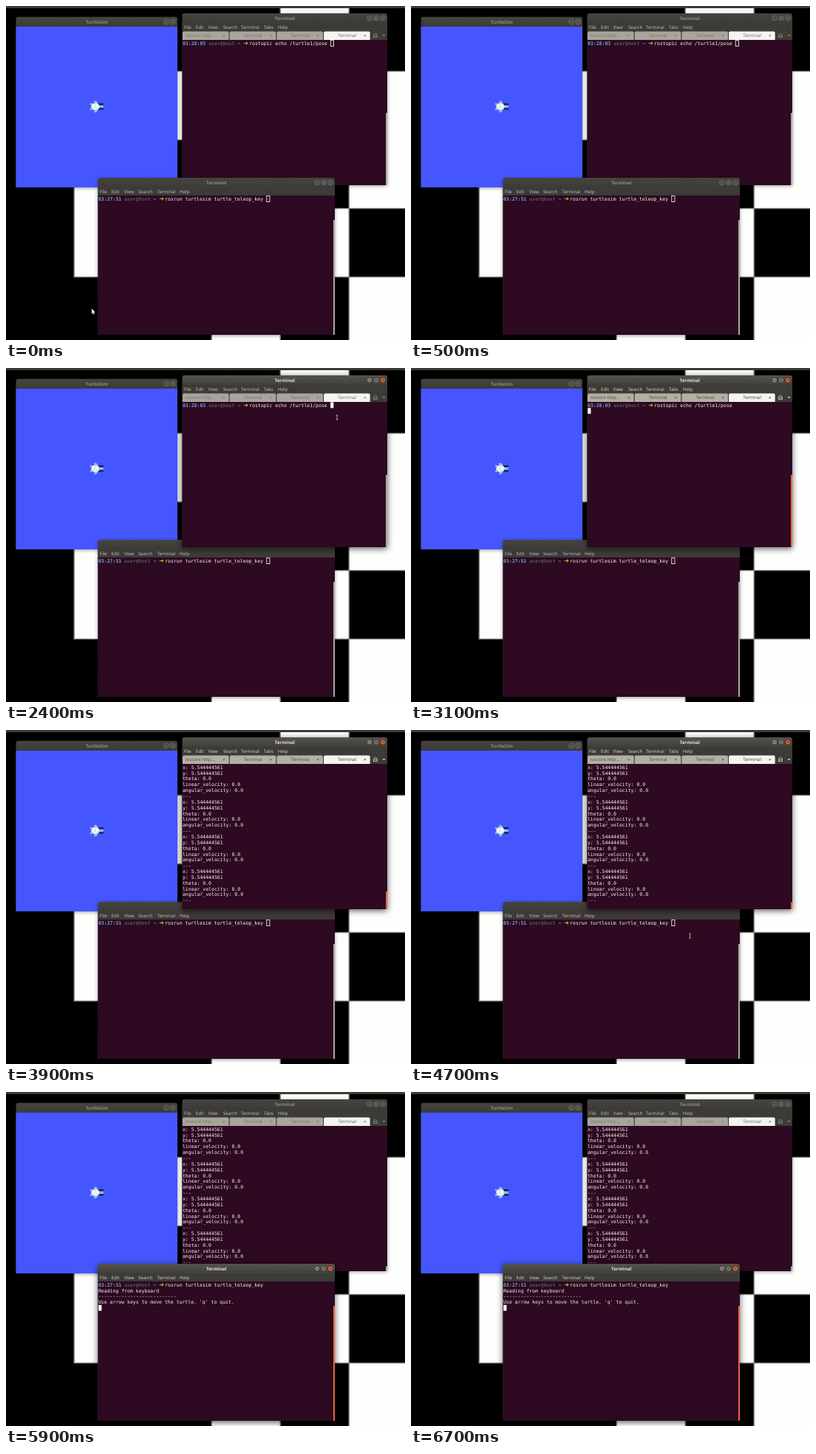
An HTML page with a canvas that plays this animation: 540 by 453 pixels, repeating every 8000 ms.

```html
<!DOCTYPE html>
<html lang="en">
<head>
<meta charset="utf-8">
<title>Turtle simulator terminals</title>
<style>
html, body { margin: 0; width: 100%; height: 100%; overflow: hidden; background: #000; }
canvas { display: block; width: 540px; height: 453px; }
</style>
</head>
<body>
<canvas id="stage" width="540" height="453"></canvas>
<script>
const ctx = document.getElementById('stage').getContext('2d');
const LOOP = 8000, STEP = 100;
const UI = '"Open Sans", "Noto Sans", sans-serif';
const MONO = '"DejaVu Sans Mono", monospace';
const CHAR = 3.92, ROW = 7.85;
const ORANGE = '#e8643c', GREY = '#aaa7a3', DARK = '#3c3b37', PLUM = '#2d0922';
const POSE = ['x: 5.544444561', 'y: 5.544444561', 'theta: 0.0',
  'linear_velocity: 0.0', 'angular_velocity: 0.0', '---'];

const TOP = { x: 238.5, y: 10, w: 277.5, h: 233, body: 46, tabs: true,
  menu: [['File', 241], ['Edit', 257], ['View', 273.5], ['Search', 294], ['Terminal', 318], ['Tabs', 349], ['Help', 368]] };
const BOTTOM = { x: 124.5, y: 233, w: 320.5, h: 213, body: 257,
  menu: [['File', 127], ['Edit', 142.5], ['View', 160], ['Search', 179], ['Terminal', 204.5], ['Help', 235]] };

function rect(x, y, w, h, color) {
  ctx.fillStyle = color;
  ctx.fillRect(x, y, w, h);
}

function text(str, x, y, color, font, align = 'left') {
  ctx.font = font;
  ctx.fillStyle = color;
  ctx.textAlign = align;
  ctx.fillText(str, x, y);
}

function stroke(points, color, width = 0.8) {
  ctx.beginPath();
  points.forEach(([x, y], i) => i ? ctx.lineTo(x, y) : ctx.moveTo(x, y));
  ctx.strokeStyle = color;
  ctx.lineWidth = width;
  ctx.stroke();
}

function ellipse(x, y, rx, ry, color, angle = 0) {
  ctx.beginPath();
  ctx.ellipse(x, y, rx, ry, angle, 0, 7);
  ctx.fillStyle = color;
  ctx.fill();
}

function cross(x, y, r, color) {
  stroke([[x - r, y - r], [x + r, y + r]], color);
  stroke([[x + r, y - r], [x - r, y + r]], color);
}

function wallpaper() {
  rect(0, 0, 540, 453, '#000');
  const cell = 93, left = -0.8, top = -4.4;
  // column, row, height in cells
  const white = [[4, 0, 1], [2, 1, 1], [5, 1, 2], [1, 2, 2], [4, 3, 1], [3, 4, 1], [5, 4, 1]];
  for (const [col, row, rows] of white) {
    const x = left + col * cell, y = top + row * cell;
    rect(x, y, cell, rows * cell, '#fefefc');
    ctx.strokeStyle = '#85837f';
    ctx.lineWidth = 1.4;
    ctx.strokeRect(x, y, cell, rows * cell);
  }
  rect(0, 0, 540, 3, DARK);
}

function button(x, y, kind, focused) {
  const close = kind === 'close';
  ellipse(x, y, 3.6, 3.6, focused ? '#2f2e2a' : '#77756d');
  ellipse(x, y, focused ? 3.1 : 2.8, focused ? 3.1 : 2.8, focused ? (close ? '#ec6038' : '#89867c') : '#45443f');
  const ink = focused ? '#35332e' : '#86847c';
  if (close) cross(x, y, 1.2, ink);
  else if (kind === 'min') stroke([[x - 1.4, y + 0.3], [x + 1.4, y + 0.3]], ink);
  else stroke([[x - 1.2, y - 1.2], [x + 1.2, y - 1.2], [x + 1.2, y + 1.2], [x - 1.2, y + 1.2], [x - 1.2, y - 1.2]], ink, 0.7);
}

function frame(win, title, focused, buttons) {
  const { x, y, w, h } = win;
  ctx.save();
  ctx.shadowColor = focused ? 'rgba(0,0,0,.65)' : 'rgba(0,0,0,.4)';
  ctx.shadowBlur = focused ? 9 : 5;
  ctx.shadowOffsetY = focused ? 2 : 1;
  const shade = ctx.createLinearGradient(0, y, 0, y + 13);
  shade.addColorStop(0, focused ? '#55534c' : '#45443f');
  shade.addColorStop(1, focused ? '#403f3a' : DARK);
  ctx.fillStyle = shade;
  ctx.beginPath();
  ctx.roundRect(x, y, w, h, [3, 3, 0, 0]);
  ctx.fill();
  ctx.restore();
  text(title, x + w / 2, y + 8.8, focused ? '#e3dfd6' : '#8f8d85', 'bold 6.25px ' + UI, 'center');
  buttons.forEach((kind, i) =>
    button(x + w - 6 - 9 * (buttons.length - 1 - i), y + 6.5, kind, focused));
}

function turtleWindow() {
  const win = { x: 13.5, y: 14.8, w: 218.5, h: 231.2 };
  frame(win, 'TurtleSim', false, ['min', 'close']);
  rect(win.x, 28, win.w, 218, '#4556ff');
  stroke([[125, 133.4], [131.8, 133.2]], '#10183c', 2.2);
  stroke([[125, 139.4], [131.8, 139.4]], '#10183c', 2.2);
  ellipse(129, 136.4, 3, 1.9, '#8fb9e8');
  ellipse(121.5, 130.8, 2.8, 1.8, '#80bcf0', 0.6);
  ellipse(121.5, 142.2, 2.8, 1.8, '#80bcf0', -0.6);
  ellipse(115.6, 133.2, 2, 1.5, '#80bcf0', 0.5);
  ellipse(115.6, 139.8, 2, 1.5, '#80bcf0', -0.5);
  ellipse(121, 136.5, 5.8, 5, '#d3e5f0');
  ellipse(120.6, 136.3, 4, 3.4, '#fbfcf4');
  stroke([[117.5, 138.8], [120, 136.7], [123.5, 138.6]], '#b3c5bd', 0.7);
  stroke([[120, 136.7], [120.8, 133]], '#b3c5bd', 0.7);
}

function tabBar(active) {
  ['roscore http:…', 'Terminal', 'Terminal', 'Terminal'].forEach((label, i) => {
    const x = 239 + i * 63.7, current = i === 3;
    ctx.beginPath();
    ctx.roundRect(x, 34.6, 62.6, 11.4, [2, 2, 0, 0]);
    ctx.fillStyle = current ? '#f5f4f0' : active ? '#b3afa5' : '#a8a59c';
    ctx.fill();
    const ink = current ? (active ? '#3c3b37' : '#66645e') : active ? '#4b4944' : '#757269';
    if (i) text(label, x + 31.5, 42.4, ink, '6.1px ' + UI, 'center');
    else text(label, x + 3.5, 42.4, ink, '6.1px ' + UI);
    cross(x + 55.7, 40.2, 1.1, ink);
  });
  const ink = active ? '#d6d2c8' : '#8b8981';
  stroke([[497.5, 42.5], [497.5, 40], [498.5, 37.8], [501.5, 37.8], [502.5, 40], [502.5, 42.5], [497, 42.5]], ink);
  stroke([[498, 40.4], [502, 40.4]], ink);
  ctx.beginPath();
  ctx.moveTo(509.5, 39);
  ctx.lineTo(513.5, 39);
  ctx.lineTo(511.5, 41.2);
  ctx.fillStyle = ink;
  ctx.fill();
}

// "focused" is the frame state; "active" is the content, which follows a moment later.
function terminal(win, focused, active, thumb, content) {
  frame(win, 'Terminal', focused, ['min', 'max', 'close']);
  const bottom = win.y + win.h;
  rect(win.x, win.y + 13, win.w, win.body - win.y - 13, DARK);
  for (const [label, x] of win.menu)
    text(label, x, win.y + 20.8, active ? '#e0dcd3' : '#c9c5bc', '6.1px ' + UI);
  if (win.tabs) tabBar(active);
  rect(win.x, win.body, win.w, bottom - win.body, PLUM);
  content(win);
  rect(win.x + win.w - 2, bottom - thumb, 2, thumb, active ? ORANGE : GREY);
}

function put(win, row, col, str, color = '#f5f2ee', font = '6.51px ' + MONO) {
  text(str, win.x + 0.4 + col * CHAR, win.body + 6.75 + row * ROW, color, font);
}

function prompt(win, clock, command) {
  const bold = 'bold 6.51px ' + MONO;
  put(win, 0, 0, clock, '#78a2d2', bold);
  put(win, 0, 9, 'user@host', '#5a565a', bold);
  put(win, 0, 19, '~', '#78a2d2', bold);
  put(win, 0, 21, '➜', '#b4c02c', '8px "DejaVu Sans", sans-serif');
  put(win, 0, 23, command, '#fbf8ea');
}

function caret(win, row, col, filled) {
  const x = win.x + 0.7 + col * CHAR, y = win.body + 0.4 + row * ROW;
  if (filled) return rect(x, y, 4.2, 7.9, '#fff');
  ctx.strokeStyle = '#eeeaea';
  ctx.lineWidth = 0.9;
  ctx.strokeRect(x + 0.2, y + 0.2, 4.2, 7.9);
}

function topTerminal(t) {
  const focused = t >= 2400 && t < 4800, active = t >= 2500 && t < 4800;
  const elapsed = Math.min(t, 5300) - 3500;
  const thumb = elapsed < 0 ? 98 : 197 * 24 / (48 + 0.375 * elapsed);
  terminal(TOP, focused, active, thumb, win => {
    const total = elapsed < 0 ? 0 : 6 * (1 + Math.round(elapsed / 16));
    const first = Math.max(0, total - 24);
    if (!first) prompt(win, '03:28:03', 'rostopic echo /turtle1/pose');
    if (t < 3100) caret(win, 0, 51, focused);
    else if (!total) caret(win, 1, 0, true);
    for (let i = first; i < total; i++)
      put(win, i - first + (first ? 0 : 1), 0, POSE[i % 6]);
  });
}

function bottomTerminal(t) {
  const focused = t >= 4800;
  terminal(BOTTOM, focused, focused, 156, win => {
    prompt(win, '03:27:51', 'rosrun turtlesim turtle_teleop_key');
    if (t < 5500) return caret(win, 0, 58, focused);
    if (t < 5900) return caret(win, 1, 0, true);
    put(win, 1, 0, 'Reading from keyboard');
    put(win, 2, 0, '-'.repeat(27));
    put(win, 3, 0, "Use arrow keys to move the turtle. 'q' to quit.");
    if (t < 6100 || t >= 6700) caret(win, 4, 0, true);
  });
}

function arrow(x, y) {
  const shape = [[0, 0], [0, 7], [1.5, 5.6], [2.6, 8], [3.6, 7.5], [2.6, 5.2], [4.7, 5]];
  ctx.beginPath();
  shape.forEach(([dx, dy]) => ctx.lineTo(x + dx, y + dy));
  ctx.closePath();
  ctx.fillStyle = '#fff';
  ctx.fill();
}

function beam(x, y) {
  const ink = '#d8d2d6';
  stroke([[x, y - 3], [x, y + 3]], ink);
  stroke([[x - 1.4, y - 3.1], [x + 1.4, y - 3.1]], ink, 0.7);
  stroke([[x - 1.4, y + 3.1], [x + 1.4, y + 3.1]], ink, 0.7);
}

function glide(t, start, end, from, to) {
  const p = Math.max(0, Math.min(1, (t - start) / (end - start)));
  const e = p * (2 - p);
  return from.map((v, i) => v + (to[i] - v) * e);
}

function pointer(t) {
  if (t < 100) arrow(116, 410.5);
  else if (t < 500) beam(...glide(t, 0, 300, [116, 411], [402, 123]));
  else if (t >= 1900 && t < 3000) beam(...glide(t, 1900, 2300, [442, 53], [448, 67]));
  else if (t >= 4400 && t < 5500) beam(...glide(t, 4300, 4800, [448, 67], [374.7, 288]));
}

function draw(t) {
  wallpaper();
  turtleWindow();
  const layers = [topTerminal, bottomTerminal];
  if (t >= 2400 && t < 4800) layers.reverse();
  layers.forEach(layer => layer(t));
  pointer(t);
}

function tick() {
  draw(Math.floor(performance.now() % LOOP / STEP) * STEP);
  requestAnimationFrame(tick);
}

ctx.textRendering = 'geometricPrecision';
tick();
</script>
</body>
</html>
```
